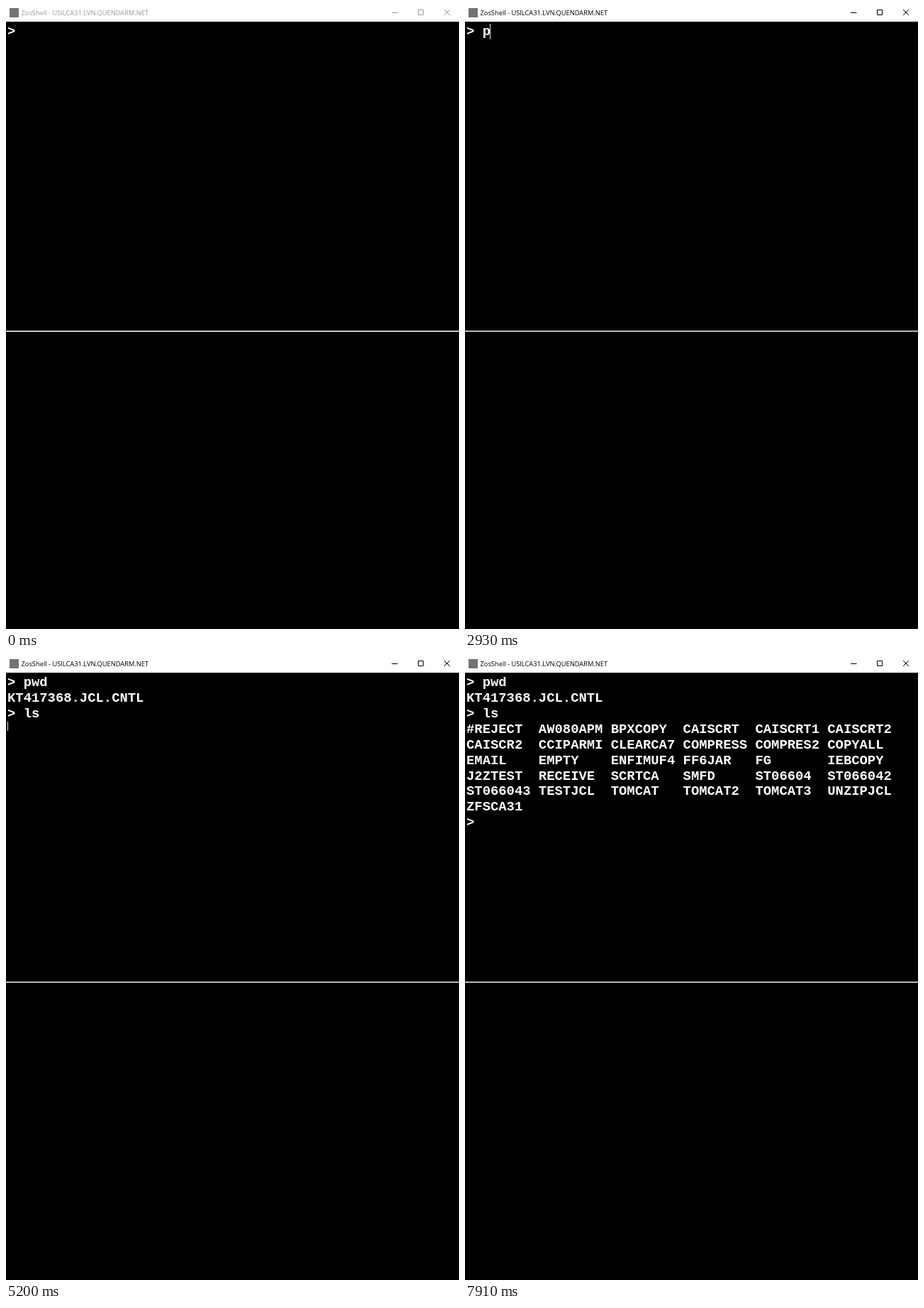
These frames come from a looping animation (639 px wide and 877 px high, 8 s). An HTML page:

```html
<!DOCTYPE html>
<html lang="en">
<head>
<meta charset="utf-8">
<title>Shell session</title>
<style>
  html, body { margin: 0; width: 100%; height: 100%; overflow: hidden; background: #000; }
  svg { display: block; width: 639px; height: 877px; }
  .title { font: 9.3px "Open Sans", "Noto Sans", sans-serif; }
  .term text {
    font: bold 18.88px "Liberation Mono", "Courier New", monospace;
    fill: #fff;
    white-space: pre;
  }
</style>
</head>
<body>
<svg viewBox="0 0 639 877">
  <rect width="639" height="877" fill="#000"/>
  <rect y="459" width="639" height="418" fill="#010101"/>

  <rect width="639" height="22" fill="#fff"/>
  <rect y="22" width="639" height="1" fill="#18222c"/>
  <rect x="5" y="3" width="13" height="13" fill="#77716f"/>
  <text id="title" class="title" x="21.5" y="13">ZosShell - USILCA31.LVN.QUENDARM.NET</text>
  <g id="buttons" fill="none" stroke-width="1">
    <path d="M544 9.5h8.500M581.500 5.500h7v7h-7zM618 5l8 8M626 5l-8 8"/>
  </g>

  <rect y="457" width="639" height="1" fill="#f2f8fb"/>
  <rect id="edge" y="458" width="639" height="1"/>

  <g id="term" class="term"></g>
  <rect id="caret" width="1" fill="#e6e6e6"/>

  <circle id="click" cx="281" cy="107" r="9.5" fill="#807900"/>
  <path id="beam" d="M0 .5h2.500M3.500 .5h2.500M3 1v11M0 12.500h2.500M3.500 12.500h2.500" fill="none" stroke="#d8d8d8"/>
</svg>
<script>
const LOOP = 8000, LEFT = 2, TOP = 25, ADVANCE = 11.33, PITCH = 21.87, ASCENT = 16.3;
const $ = id => document.getElementById(id);

const afterPwd = ["> pwd", "KT417368.JCL.CNTL"];
const afterLs = [...afterPwd, "> ls"];
const members = `#REJECT AW080APM BPXCOPY CAISCRT CAISCRT1 CAISCRT2
CAISCR2 CCIPARMI CLEARCA7 COMPRESS COMPRES2 COPYALL
EMAIL EMPTY ENFIMUF4 FF6JAR FG IEBCOPY
J2ZTEST RECEIVE SCRTCA SMFD ST06604 ST066042
ST066043 TESTJCL TOMCAT TOMCAT2 TOMCAT3 UNZIPJCL
ZFSCA31`.split("\n").map(row => row.split(" ").map(name => name.padEnd(9)).join("").trimEnd());

// Each step: start time and the terminal's lines; the caret follows the last line.
const screens = [
  [0, ["> "]],
  [2930, ["> p"]],
  [3130, ["> pw"]],
  [3200, ["> pwd"]],
  [3330, [...afterPwd, "> "]],
  [3940, [...afterPwd, "> l"]],
  [4070, afterLs],
  [4150, [...afterLs, ""]],
  [5400, [...afterLs, ...members, "> "]]
];

// The caret changes between shown and hidden at each of these times.
const blinks = [1530, 2060, 2520, 3800, 3940, 4670, 5200, 5870, 6390, 6850, 7380, 7910];

const rows = Array.from({ length: 10 }, (_, i) => {
  const row = document.createElementNS("http://www.w3.org/2000/svg", "text");
  row.setAttribute("x", LEFT);
  row.setAttribute("y", TOP + ASCENT + i * PITCH);
  return $("term").appendChild(row);
});

const set = (id, attrs) => {
  for (const [key, value] of Object.entries(attrs)) $(id).setAttribute(key, value);
};
const show = (id, on) => set(id, { visibility: on ? "visible" : "hidden" });

function draw(t) {
  const lines = screens.filter(([start]) => t >= start).pop()[1];
  rows.forEach((row, i) => {
    const line = lines[i] || "";
    if (row.textContent !== line) row.textContent = line;
  });

  const last = lines.length - 1, column = lines[last].length;
  set("caret", {
    x: Math.floor(LEFT + column * ADVANCE),
    y: Math.round(TOP + last * PITCH),
    height: column ? 22 : 13
  });
  show("caret", blinks.filter(time => t >= time).length % 2);

  const active = t >= 1530;
  set("title", { fill: active ? "#000" : "#999" });
  set("buttons", { stroke: active ? "#000" : "#999" });
  set("edge", { fill: active ? "#66757d" : "#8c9aa2" });

  show("click", active && t < 1600);
  show("beam", t >= 1190 && t < 1800);
  set("beam", { transform: t < 1260 ? "translate(360 116)" : "translate(280 101)" });
}

function frame() {
  draw(performance.now() % LOOP);
  requestAnimationFrame(frame);
}
frame();
</script>
</body>
</html>
```
